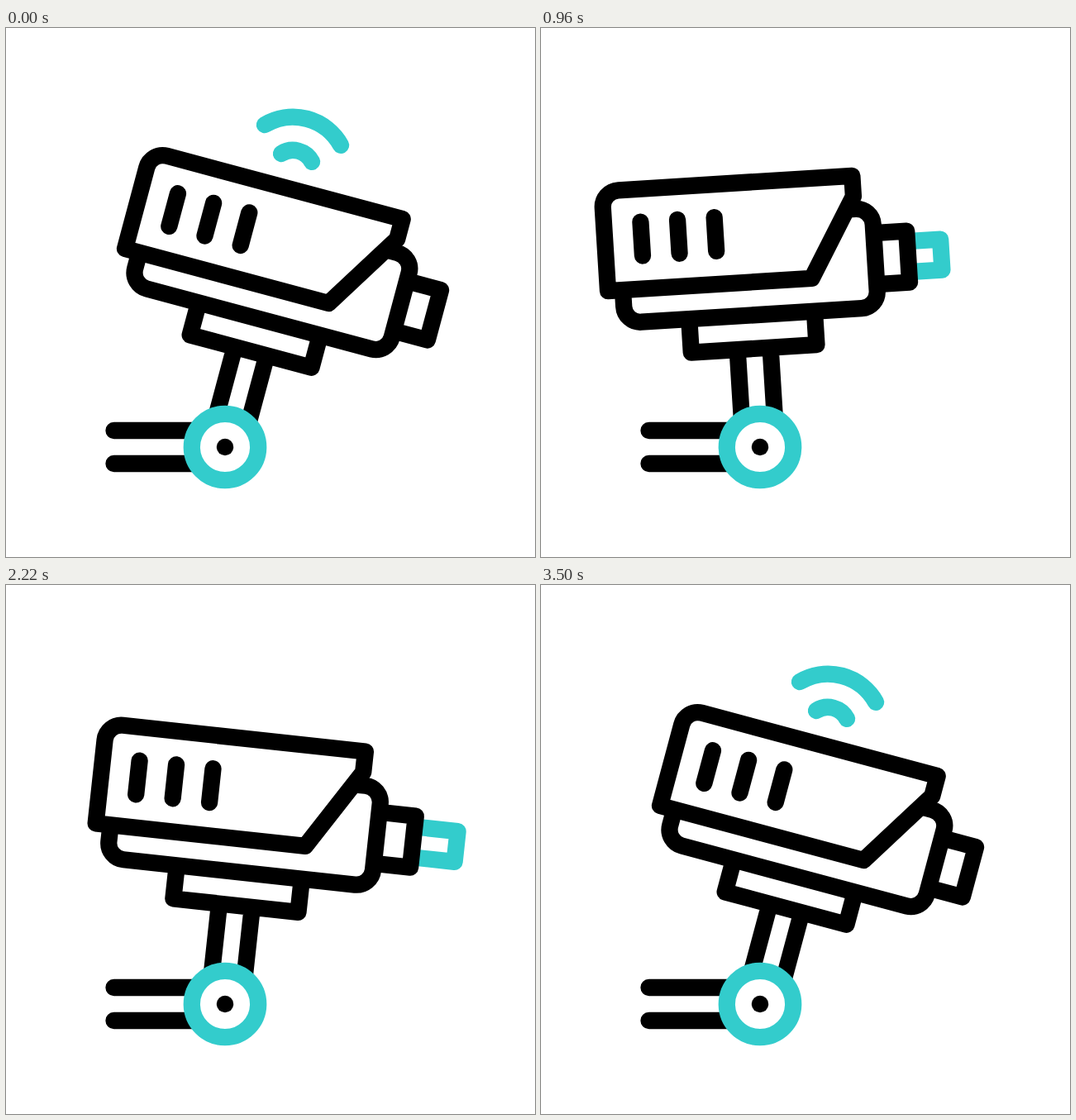
An HTML page that plays this animation: 640x640 px, repeating every 3600 ms.

```html
<!DOCTYPE html>
<html lang="en">
<head>
<meta charset="utf-8">
<title>Security camera</title>
<style>
  html, body { margin: 0; width: 100%; height: 100%; overflow: hidden; background: #fff; }
  svg { display: block; width: 100vw; height: 100vh; }
  path, circle { fill: none; stroke: #000; stroke-width: 20.3; stroke-linejoin: round; }
  .round { stroke-linecap: round; }
  .teal { stroke: #3cc; }
</style>
</head>
<body>
<svg viewBox="0 0 640 640">
  <path class="round" d="M130.5 487H240M130.5 527H240"/>
  <g transform="translate(265 507)">
    <g id="camera">
      <g id="signal">
        <path id="outerWave" class="teal round" d="M-54.6-389A66.3 66.3 0 0 1 40.8-389"/>
        <path id="innerWave" class="teal round" d="M-26.2-360.5A25.8 25.8 0 0 1 12.2-360.5"/>
      </g>
      <path id="zoom" class="teal"/>
      <path id="lens"/>
      <path id="body"/>
      <path id="housing"/>
      <path id="vents" class="round"/>
      <path d="M-76-160.5V-120H76V-160.5M-20-120V-30M20-120V-30"/>
    </g>
    <circle class="teal" r="40.2" style="fill:#fff"/>
    <circle r="10.2" style="fill:#000;stroke:none"/>
  </g>
</svg>
<script>
const LOOP = 3600;
const $ = id => document.getElementById(id);
const draw = (id, d) => $(id).setAttribute('d', d);
const move = (id, transform) => $(id).setAttribute('transform', transform);

// Soft start and stop, halfway between linear and a cosine.
const ease = u => u / 2 + (1 - Math.cos(Math.PI * u)) / 4;

// Eased swings between [time, value] turning points.
const swing = (...keys) => t => keys.reduce((value, [end, target], i) => {
  if (!i) return target;
  const start = keys[i - 1][0];
  const u = Math.min(1, Math.max(0, (t - start) / (end - start)));
  return value + (target - keys[i - 1][1]) * ease(u);
}, 0);

const blink = (out, back) => swing([out, 1], [out + 220, 0], [back, 0], [back + 260, 1]);

const angle = swing([110, 15], [610, -12.6], [1575, 15], [2040, 2.1], [2430, 11.1], [2740, 7.5], [3350, 15]);
const turn = swing([110, 0], [580, 1], [1100, 0]);
const focus = swing([1100, 0], [1900, -2], [2670, 8], [3340, 0]);
const reach = swing([660, 0], [1060, 50], [3000, 54], [3340, 0]);
const lift = swing([300, 0], [720, 45], [1500, 0]);
const outerAlpha = blink(490, 3080);
const innerAlpha = blink(560, 2900);

function render(t) {
  const p = turn(t), shift = 32.5 * p;
  const left = -179 + shift, front = 136 - 21 * p, right = 160.5 - 34 * p;
  const top = -322 + 3 * p, lensTop = -251 + 2 * p;
  const lensX = 203 - 46 * p + focus(t), zoomX = lensX + reach(t);

  move('camera', `rotate(${angle(t)}) translate(0 ${3 * p})`);
  move('signal', `translate(${-lift(t) / 10} ${-lift(t)})`);
  $('outerWave').style.opacity = outerAlpha(t);
  $('innerWave').style.opacity = innerAlpha(t);

  draw('housing', `M${left}-200.5V${top + 20}a20 20 0 0 1 20-20H${front}v25L${76 - 4 * p}-200.5Z`);
  draw('body', `M${left + 18}-200.5v20a20 20 0 0 0 20 20H${right - 20}a20 20 0 0 0 20-20`
    + `V-261a20 20 0 0 0-20-20H${front - 7}`);
  draw('vents', [0, 1, 2].map(i => `M${left + 44.5 + 44.7 * i}-281.5v41`).join(''));
  draw('lens', `M${right} ${lensTop}H${lensX}V-188.5H${right}`);
  draw('zoom', `M${lensX}-238H${zoomX}V-201H${lensX}`);
  $('zoom').style.display = zoomX - lensX > .2 ? '' : 'none';
}

function tick() {
  render(performance.now() % LOOP);
  requestAnimationFrame(tick);
}
tick();
</script>
</body>
</html>
```
